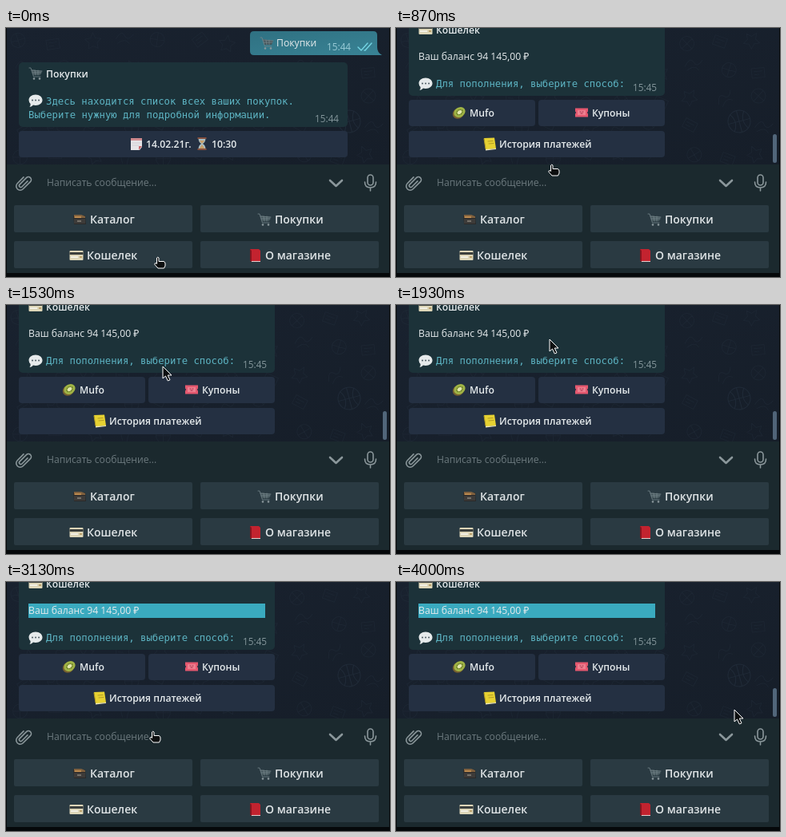
These frames come from a looping animation (480x312 px, 4.14 s). An HTML page:

```html
<!DOCTYPE html>
<html lang="ru">
<head>
<meta charset="utf-8">
<title>Чат с ботом</title>
<style>
html, body { margin: 0; width: 100%; height: 100%; overflow: hidden; background: #000; }
svg { display: block; width: 480px; height: 312px; }
text { font: 12.2px "Open Sans", "Noto Sans", sans-serif; fill: #e6ebed; white-space: pre; }
.bold { font-weight: 600; }
.key { font-size: 14px; font-weight: 600; fill: #dfe4e6; }
.mono { font: 12.25px "DejaVu Sans Mono", "Noto Sans Mono", monospace; fill: #5db4c3; }
.time { font-size: 11.8px; fill: #84969b; }
.sent { fill: #9accd7; }
.hint { fill: #6c797e; }
.line { fill: none; stroke-linecap: round; stroke-linejoin: round; }
</style>
</head>
<body>
<svg id="stage" viewBox="0 0 480 312">
  <defs>
    <linearGradient id="wall" x2="1" y2="1">
      <stop stop-color="#19222f"/><stop offset="1" stop-color="#161e29"/>
    </linearGradient>
    <linearGradient id="out" x2="1" y2="1">
      <stop stop-color="#2f7182"/><stop offset="1" stop-color="#398395"/>
    </linearGradient>
    <clipPath id="chatClip"><rect width="480" height="171"/></clipPath>
    <clipPath id="walletClip"><rect x="10" y="267" width="223" height="34" rx="2"/></clipPath>

    <symbol id="cart" viewBox="0 0 18 18">
      <path d="M4 4 17 6 15 11 6 11Z" fill="#45565c"/>
      <path class="line" d="M1 2h2l3.500 11H15M4 5l13 1M5 8h11M8 5l1 6M12 5v6" stroke="#75868b" stroke-width=".8"/>
      <circle cx="7" cy="15.500" r="1.300" fill="#8b989c"/><circle cx="14" cy="15.500" r="1.300" fill="#8b989c"/>
    </symbol>
    <symbol id="speech" viewBox="0 0 18 18">
      <path d="M9 1.500c5 0 8.500 3 8.500 6.800S14 15 9 15q-2 0-3-.4Q4 17 1.500 17 3 15 2.600 13 .5 11 .5 8.300C.5 4.500 4 1.500 9 1.500Z" fill="#e6eaeb"/>
      <path class="line" d="M5 8.500h.1M9 8.500h.1M13 8.500h.1" stroke="#56636a" stroke-width="2"/>
    </symbol>
    <symbol id="calendar" viewBox="0 0 18 18">
      <path d="M2 2h14v11l-3 4H2Z" fill="#e6e4e7"/><path d="M2 2h14v3H2Z" fill="#cf8a8e"/>
      <path d="M16 12h-4v5Z" fill="#c8656b"/>
      <path class="line" d="M4 8h10M4 11h8" stroke="#cfd0d6"/>
    </symbol>
    <symbol id="hourglass" viewBox="0 0 18 18">
      <path d="M4.500 2h9q0 5-3.500 7 3.500 2 3.500 7h-9q0-5 3.500-7-3.500-2-3.500-7Z" fill="#a9bfc5"/>
      <path d="M5.500 5h7L9 9ZM9 10l4 6H5Z" fill="#c8a06a"/>
      <path d="M3.500 1h11v2h-11ZM3.500 15h11v2h-11Z" fill="#85503e"/>
    </symbol>
    <symbol id="card" viewBox="0 0 18 18">
      <rect x=".5" y="3" width="17" height="12" rx="1" fill="#ddd6b8"/>
      <path d="M.5 5h17v3H.5Z" fill="#3c403d"/><path d="M2 10h9v2H2Z" fill="#f3f1e6"/>
      <path d="M13 10h3v2h-3Z" fill="#b99f68"/>
    </symbol>
    <symbol id="box" viewBox="0 0 18 18">
      <path d="M1 4h15l1 11H2Z" fill="#2b2928"/><path d="M2 3h9l5 2v2H2Z" fill="#80613f"/>
      <path d="M3 5h8v2H3Z" fill="#bd8c50"/><path d="M2 8h14v6H2Z" fill="#3d3b39"/>
      <path d="M6 10h5v2H6Z" fill="#77726a"/>
    </symbol>
    <symbol id="book" viewBox="0 0 18 18">
      <path d="M3 1h11l2 2v14H5l-2-2Z" fill="#c3232f"/><path d="M3 1l2 2v14l-2-2Z" fill="#86151f"/>
      <path d="M5 16h11v1H5Z" fill="#e4cfcf"/>
    </symbol>
    <symbol id="notebook" viewBox="0 0 18 18">
      <path d="m2 2 13-.500 2 13.500-13 1.500Z" fill="#e6d132"/><path d="m4 16 13-1v1L4 17.500Z" fill="#f0eac0"/>
      <path class="line" d="m2 3 2 12M7 6l6-.5M8 9l6-.5" stroke="#b39b26"/>
    </symbol>
    <symbol id="ticket" viewBox="0 0 18 18">
      <path d="M1 3.500h16v4q-2 1.500 0 3v4H1v-4q2-1.500 0-3Z" fill="#e5586f"/>
      <rect x="4" y="6" width="10" height="6" fill="#ee7f90"/>
      <path class="line" d="M7 8h1M10 8h1M8 10h2" stroke="#a12c48"/>
    </symbol>
    <symbol id="fruit" viewBox="0 0 18 18">
      <ellipse cx="8" cy="10" rx="7.500" ry="6.500" fill="#77602f" transform="rotate(-35 8 10)"/>
      <g transform="rotate(-35 9.500 8.500)">
        <ellipse cx="9.500" cy="8.500" rx="7.500" ry="6" fill="#a0b445"/>
        <ellipse cx="9.500" cy="8.500" rx="4" ry="3" class="line" stroke="#536423" stroke-dasharray=".7 1.600"/>
        <ellipse cx="9.500" cy="8.500" rx="3" ry="2" fill="#e3e6b4"/>
      </g>
    </symbol>
  </defs>

  <rect width="480" height="171" fill="url(#wall)"/>
  <g id="doodles" class="line" stroke="#232e3c" clip-path="url(#chatClip)"></g>
  <g clip-path="url(#chatClip)"><g id="chat"></g></g>
  <rect id="scrollbar" x="471" y="133" width="5" height="36" rx="2.500" fill="#51667a"/>
  <path d="M0 171h480v136H0Z" fill="#1b292e"/>
  <g id="panel"></g>
  <g clip-path="url(#walletClip)"><circle id="ripple" cx="190" cy="288" fill="#5c747d"/></g>
  <g id="labels"></g>
  <path d="M0 0h1v312H0ZM479 0h1v312h-1ZM0 307h480v5H0Z" fill="#05080a"/>
  <g id="pointer" stroke="#fff" stroke-linejoin="round" fill="#0d0f10">
    <path id="arrow" d="M0 0v15l3.500-3 2.800 6 2.700-1.200-2.700-5.800H11Z" stroke-width="1"/>
    <path id="hand" d="M-1.500 1Q-.2-.6 1 1V5.500H7Q9 6 9 8v3L7.500 14H0L-4 9.500Q-4.500 7.500-2.800 7.500L-1.500 8.500Z" stroke-width="1"/>
  </g>
</svg>
<script>
const LOOP = 4140, STEP = 1000 / 15;
const $ = id => document.getElementById(id);

const text = (x, y, s, cls = "") => `<text x="${x}" y="${y}" class="${cls}">${s}</text>`;
const icon = (name, x, cy, size = 18) =>
  `<use href="#${name}" x="${x}" y="${cy - size / 2}" width="${size}" height="${size}"/>`;
const rect = (x, y, w, h, fill, r = 4) =>
  `<rect x="${x}" y="${y}" width="${w}" height="${h}" rx="${r}" fill="${fill}"/>`;
const stroke = (d, color, width) =>
  `<path class="line" d="${d}" stroke="${color}" stroke-width="${width}"/>`;

const inlineButton = (x, y, w) => rect(x, y, w, 33, "#243042");
const bubble = (y, w, h) => rect(16, y, w, h, "#1c3239", 5);
const ticks = y => stroke(`M440 ${y + 1}l4 4 8-9M448 ${y + 5}l1 0 8-9`, "#74d5e4", 1.4);

function sentMessage(x, y, name, label, time, status) {
  const shape = `M${x + 5} ${y}H459q5 0 5 5v15q0 7 6 10H${x + 5}q-5 0-5-5V${y + 5}q0-5 5-5Z`;
  return `<path d="${shape}" fill="url(#out)"/>` + icon(name, x + 12, y + 15) +
    text(x + 33, y + 19, label) + text(401, y + 24, time, "time sent") + status;
}

$("chat").innerHTML =
  sentMessage(305, 4, "cart", "Покупки", "15:44", ticks(23)) +
  bubble(43, 411, 81) + icon("cart", 28, 57) + text(50, 62, "Покупки", "bold") +
  icon("speech", 28, 91) + text(50, 96, "Здесь находится список всех ваших покупок.", "mono") +
  text(28, 113, "Выберите нужную для подробной информации.", "mono") +
  text(386, 118, "15:44", "time") +
  inlineButton(16, 129, 411) + icon("calendar", 154, 145) + text(175, 150, "14.02.21г.", "bold") +
  icon("hourglass", 236, 145) + text(257, 150, "10:30", "bold") +
  `<g id="order">` +
  sentMessage(302, 170, "card", "Кошелек", "15:45",
    `<g id="pending"><circle cx="447" cy="190" r="5" fill="#94cfdb"/>` +
    stroke("M447 187v3h3", "#347b8e", 1.2) + `</g><g id="delivered">${ticks(189)}</g>`) + `</g>` +
  `<g id="wallet">` + bubble(208, 320, 97) + icon("card", 28, 222) + text(50, 227, "Кошелек", "bold") +
  `<rect id="selection" y="247" height="18" fill="#3aaabf"/>` +
  text(28, 260, "Ваш баланс 94 145,00 ₽") +
  icon("speech", 28, 290) + text(50, 294, "Для пополнения, выберите способ:", "mono") +
  text(296, 299, "15:45", "time") +
  inlineButton(16, 310, 158) + icon("fruit", 70, 326) + text(92, 331, "Mufo", "bold") +
  inlineButton(178, 310, 158) + `<g id="hover">${rect(178, 310, 158, 33, "#3b4b58")}</g>` +
  icon("ticket", 223, 326) + text(245, 331, "Купоны", "bold") +
  inlineButton(16, 349, 320) + icon("notebook", 108, 365) + text(129, 370, "История платежей", "bold") +
  `</g>`;

const keys = [
  [10, 222, "box", 83, "Каталог", 105], [243, 222, "cart", 314, "Покупки", 336],
  [10, 267, "card", 79, "Кошелек", 101], [243, 267, "book", 302, "О магазине", 324]
];
const gray = "#8b979b";
$("panel").innerHTML = keys.map(([x, y]) => rect(x, y, 223, 34, "#2a3a42", 2)).join("");
$("labels").innerHTML =
  keys.map(([, y, name, ix, label, tx]) => icon(name, ix, y + 18) + text(tx, y + 23, label, "key")).join("") +
  text(51, 198, "Написать сообщение...", "hint") +
  stroke("M405 191l7.500 7 7.500-7", gray, 2.6) +
  `<g transform="translate(22 194) rotate(45)">` +
  stroke("M-5 -5V6a5 5 0 0 0 10 0V-7a3.500 3.500 0 0 0-7 0V5a2 2 0 0 0 4 0V-5", gray, 1.6) + `</g>` +
  rect(452, 184, 7, 13, "none", 3.5).replace("/>", ` stroke="${gray}" stroke-width="1.600"/>`) +
  stroke("M448.500 193q0 7 7 7t7-7M455.500 200v4", gray, 1.6);

// Faint wallpaper outlines
function drawDoodles() {
  let seed = 11, out = "";
  const random = () => (seed = seed * 16807 % 2147483647) / 2147483647;
  const shapes = [
    "M-9 0a9 9 0 1 0 18 0a9 9 0 1 0-18 0M-9 0h18M0-9v18",
    "M-8-6h16v12h-16ZM-5-2h10M-5 2h6",
    "M0-10l3 7 7 1-5 5 1 7-6-3-6 3 1-7-5-5 7-1Z",
    "M-10 5q3-14 9-8t10-5M-6 9q7-10 14-4"
  ];
  for (let i = 0; i < 55; i++) {
    const x = 15 + i % 11 * 43 + random() * 15, y = 10 + Math.floor(i / 11) * 36 + random() * 12;
    if (Math.hypot(x - 429, y - 117) < 28) continue;
    out += `<path d="${shapes[i % 4]}" transform="translate(${x} ${y}) rotate(${random() * 90 - 45})" opacity=".45"/>`;
  }
  out += `<g transform="translate(429 117) rotate(-15)" opacity=".8"><circle r="14"/>
    <path d="M-14 0H14M0-14V14M-9-11q8 11 0 22M9-11q-8 11 0 22"/></g>`;
  $("doodles").innerHTML = out;
}

const clamp = (v, a = 0, b = 1) => Math.min(b, Math.max(a, v));
const easeOut = p => 1 - (1 - clamp(p)) ** 3;
const smooth = p => p * p * (3 - 2 * p);

// time, x, y of the pointer tip
const route = [
  [0, 190, 287], [600, 190, 287], [1060, 198, 99], [1330, 198, 99], [1800, 192, 43],
  [2060, 192, 43], [2400, 18, 37], [2600, 18, 37], [3060, 184, 187], [3200, 184, 187],
  [3900, 423, 160], [LOOP, 423, 160]
];
function pointerAt(t) {
  const i = Math.max(1, route.findIndex(k => k[0] >= t));
  const [t0, x0, y0] = route[i - 1], [t1, x1, y1] = route[i];
  const p = smooth(clamp((t - t0) / (t1 - t0)));
  return [x0 + (x1 - x0) * p, y0 + (y1 - y0) * p];
}

const set = (id, attrs) => Object.entries(attrs).forEach(([k, v]) => $(id).setAttribute(k, v));
const show = (id, on) => set(id, { visibility: on ? "inherit" : "hidden" });

function render(t) {
  const scroll = Math.round(38 * easeOut((t - 180) / 240) + 182 * easeOut((t - 640) / 240));
  set("chat", { transform: `translate(0 ${-scroll})` });
  show("order", t >= 180);
  show("wallet", t >= 640);
  show("pending", t < 520);
  show("delivered", t >= 520 && t < 1000);

  const [x, y] = pointerAt(t);
  const hand = t < 1480 || t > 2790 && t < 3260;
  set("pointer", { transform: `translate(${Math.round(x)} ${Math.round(y)})` });
  show("hand", hand);
  show("arrow", !hand);
  const overCoupons = x > 178 && x < 336 && y > 90 && y < 123;
  set("hover", { opacity: overCoupons ? 0.4 : 0 });

  const left = clamp(x, 28, 167);
  const selected = t >= 2400 || t > 2060 && x < 167;
  const edge = t >= 2400 ? 28 : left;
  set("selection", { x: edge, width: selected ? 324 - edge : 0 });

  const barY = t < 640 ? 131 : 133;
  set("scrollbar", { y: barY, height: 169 - barY,
    opacity: clamp((t - 180) / 600) * clamp((2130 - t) / 200) + clamp((t - 3450) / 150) });
  set("ripple", { r: 160 * easeOut((t - 70) / 650),
    opacity: t < 70 ? 0 : 0.12 * clamp((800 - t) / 300) });
}

drawDoodles();
const start = performance.now();
function tick() {
  const t = (performance.now() - start) % LOOP;
  render(Math.min(4000, Math.floor((t + 4) / STEP) * STEP));
  requestAnimationFrame(tick);
}
tick();
</script>
</body>
</html>
```
